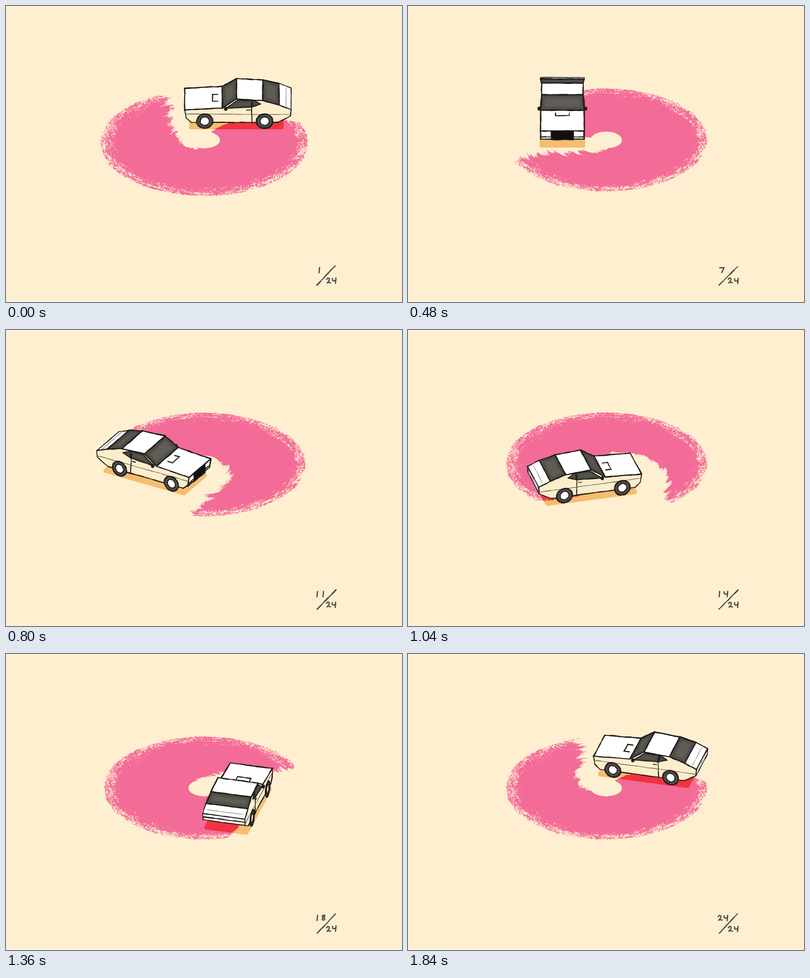
An HTML page with a canvas for the animation above (1.92 s loop, 800 by 600 pixels).

```html
<!DOCTYPE html>
<html lang="en">
<head>
<meta charset="utf-8">
<title>Drifting car</title>
<style>
  html, body { margin: 0; width: 100%; height: 100%; overflow: hidden; background: #fdefd0; }
  canvas { display: block; }
</style>
</head>
<body>
<canvas id="stage" width="800" height="600"></canvas>
<script>
const ctx = document.getElementById('stage').getContext('2d');
const PAPER = '#fdefd0', CREAM = '#fcedcb', WHITE = '#fff', GLASS = '#5f5d55', INK = '#1d1b18';
const RAD = Math.PI / 180, STEP = 80, STEPS = 24;
const clamp = (v, a = 0, b = 1) => Math.min(b, Math.max(a, v));

// Step, car angle, car radius, tail angle, inner lag of the tail, lag power, trail growth
const KEYS = [
  [0, 50.9, 111, 112, 80, 4, 6],
  [3, 96, 104, 140, 75, 2.2, 0],
  [6, 144, 99, 199, 45, 4, 0],
  [10, 207.6, 99, 261, 100, 3, 1],
  [13, 254.4, 108, 309, 130, 2, 0],
  [17, 312, 116, 382, 70, 4, 0],
  [23, 395.7, 113, 464, 85, 4, 0],
  [24, 410.9, 111, 472, 80, 4, 6]
];
function poseAt(n) {
  const i = KEYS.findIndex(k => k[0] > n), a = KEYS[i - 1], b = KEYS[i];
  const t = (n - a[0]) / (b[0] - a[0]);
  return a.map((v, j) => v + (b[j] - v) * t);
}

// Seeded randomness and value noise
let seed = 1;
function rnd() {
  seed = (seed * 1664525 + 1013904223) >>> 0;
  return seed / 4294967296;
}
const hash = (x, y) => {
  const s = Math.sin(x * 127.1 + y * 311.7) * 43758.5453;
  return s - Math.floor(s);
};
function noise(x, y) {
  const i = Math.floor(x), j = Math.floor(y), u = x - i, v = y - j;
  const top = hash(i, j) * (1 - u) + hash(i + 1, j) * u;
  const low = hash(i, j + 1) * (1 - u) + hash(i + 1, j + 1) * u;
  return top * (1 - v) + low * v;
}

// Crayon trail, shaded per pixel inside this box
const BOX = { x: 185, y: 158, w: 430, h: 234 };
const layer = document.createElement('canvas');
layer.width = BOX.w;
layer.height = BOX.h;
const pen = layer.getContext('2d');
const image = pen.createImageData(BOX.w, BOX.h);
const grain = new Float32Array(BOX.w * BOX.h);
for (let i = 0; i < grain.length; i++) {
  const x = i % BOX.w, y = Math.floor(i / BOX.w);
  const dx = x + BOX.x - 400, dy = (y + BOX.y - 271) * 1.94;
  const r = Math.hypot(dx, dy), a = Math.atan2(dy, dx);
  grain[i] = .6 * noise(x / 1.7, y / 1.7) + .4 * noise(r / 5, a * 9 + 40);
}

function drawTrail(n, [, car, , tail, lag, power, grow]) {
  const rx = 202 + grow, ry = rx * .515, cy = 271 + grow, px = image.data;
  const rag = Array.from({ length: 230 }, (_, k) => noise(k / 7, n * 9) * .7 + noise(k / 2, n * 5) * .3);
  for (let i = 0; i < grain.length; i++) {
    const x = i % BOX.w + BOX.x, y = Math.floor(i / BOX.w) + BOX.y;
    const dx = (x - 400) / rx, dy = (y - cy) / ry, r = Math.hypot(dx, dy);
    let alpha = 0;
    if (r < 1.03) {
      const u = clamp((r * 201 - 32) / 169);
      const start = car + 28 - 56 * u;
      const end = tail + lag * (1 - u) ** power - 360;
      const back = (((start - Math.atan2(-dy, dx) / RAD) % 360) + 360) % 360;
      const arc = RAD * r * rx, rim = (1 - r) * rx;
      const hole = Math.hypot((x - 400) / 31, (y - 271) / 16.5);
      const left = (start - end - back) * arc - (rag[Math.round(r * rx)] - .5) * 36;
      const dens = Math.min(
        clamp((rim + 5) / 6) * (.56 + .56 * clamp((rim - 8) / 38)),
        left / 22, back * arc / 6, (hole - 1) * 20);
      if (back < 359) alpha = clamp((dens - grain[i]) * 3 + .4);
    }
    px.set([243, 107, 151, alpha * 255], i * 4);
  }
  pen.putImageData(image, 0, 0);
}

function trace(c, pts) {
  c.beginPath();
  pts.forEach(p => c.lineTo(p[0], p[1]));
}

// Uneven hand-drawn line
function sketch(pts, w = 2.4, color = INK) {
  ctx.strokeStyle = color;
  ctx.lineCap = ctx.lineJoin = 'round';
  let last = pts[0];
  for (let i = 1; i < pts.length; i++) {
    const [ax, ay] = pts[i - 1], [bx, by] = pts[i];
    const parts = Math.ceil(Math.hypot(bx - ax, by - ay) / 11);
    for (let k = 1; k <= parts; k++) {
      const t = k / parts;
      const next = [ax + (bx - ax) * t + (rnd() - .5) * .7, ay + (by - ay) * t + (rnd() - .5) * .7];
      ctx.lineWidth = w * (.75 + rnd() * .5);
      trace(ctx, [last, next]);
      ctx.stroke();
      last = next;
    }
  }
}

function shape(pts, fill, w) {
  trace(ctx, pts);
  ctx.closePath();
  ctx.fillStyle = fill;
  ctx.fill();
  if (fill === GLASS) {
    ctx.save();
    ctx.clip();
    ctx.strokeStyle = 'rgba(30,29,25,.16)';
    for (const width of [16, 8]) {
      ctx.lineWidth = width;
      ctx.stroke();
    }
    ctx.restore();
  }
  sketch([...pts, pts[0]], w);
}

const facing = pts => pts.reduce((sum, p, i) => {
  const q = pts[(i + 1) % pts.length];
  return sum + p[0] * q[1] - q[0] * p[1];
}, 0) > 0;

// Car outline seen from the side: forward, up
const PROFILE = [[98, 18], [101, 36], [25, 40], [-4, 57], [-57, 54], [-90, 46], [-114, 37], [-113, 24]];
const FILLS = [WHITE, WHITE, GLASS, WHITE, GLASS, WHITE, WHITE];
const SILL = [[-113, 24], [-88, 11], [88, 11], [98, 20]];
const half = z => z > 50 ? 42 : 44;

function drawCar(n, [, angle, radius]) {
  const h = (180 + 15 * n) * RAD, sin = Math.sin(h), cos = Math.cos(h);
  const cx = 392 + radius * Math.cos(angle * RAD), cy = 268 - radius * Math.sin(angle * RAD) / 2;
  const at = (x, y, z) => [cx + x * cos - y * sin, cy - (x * sin + y * cos) / 2 - z];

  const shadow = [[88, 42], [88, -42], [-95, -42], [-95, 42]].map(p => at(...p, 0));
  const cast = (c, color) => {
    trace(c, shadow);
    c.closePath();
    c.fillStyle = c.strokeStyle = color;
    c.lineJoin = 'round';
    c.lineWidth = 8;
    c.fill();
    c.stroke();
  };
  cast(ctx, '#f5bd70');
  pen.save();
  pen.globalCompositeOperation = 'source-atop';
  pen.translate(-BOX.x, -BOX.y);
  cast(pen, '#f2323f');
  pen.restore();
  ctx.drawImage(layer, BOX.x, BOX.y);

  const mirror = side => {
    const [x, y] = at(18, side * 47, 40);
    ctx.fillStyle = INK;
    ctx.beginPath();
    ctx.ellipse(x, y, 3.4, 4, 0, 0, 7);
    ctx.fill();
  };
  mirror(1);
  mirror(-1);

  const details = {
    0() {
      shape([[22, 35], [-22, 35], [-22, 18], [22, 18]].map(([y, z]) => at(100, y, z)), '#11100f');
      for (const s of [-1, 1]) sketch([at(99, s * 42, 23), at(99, s * 24, 23)], 2);
    },
    1() { sketch([at(34, 14, 39), at(45, 14, 39), at(45, -14, 39), at(34, -14, 39)], 2); },
    5() { sketch([at(-104, 38, 41), at(-104, -38, 41)], 1.2, '#8d8a83'); },
    6() { sketch([at(-113, 43, 30), at(-113, -43, 30)], 2.4 * sin); }
  };
  const order = FILLS.map((_, i) => i);
  if (sin <= 0) order.reverse();
  for (const i of order) {
    const [a, b] = [PROFILE[i], PROFILE[i + 1]];
    const ha = half(a[1]), hb = half(b[1]);
    const pts = [at(a[0], ha, a[1]), at(a[0], -ha, a[1]), at(b[0], -hb, b[1]), at(b[0], hb, b[1])];
    if (!facing(pts)) continue;
    shape(pts, FILLS[i], i > 4 ? 1.8 : 2.4);
    details[i]?.();
  }

  if (Math.abs(cos) > .01) drawSide(cos < 0 ? 1 : -1, at, mirror);
}

function drawSide(side, at, mirror) {
  const map = pts => pts.map(([x, z]) => at(x, side * half(z), z));
  shape(map([...PROFILE.slice(1, 7), ...SILL]), CREAM, 2);
  shape(map([[18, 39], [-34, 42], [-35, 55], [-6, 55]]), GLASS, 2);
  shape(map([[-35, 42], [-37, 55], [-53, 48]]), GLASS, 1.8);
  sketch(map([[-34, 42], [-35, 11]]), 1.8);
  sketch(map([[97, 28], [-111, 27]]), 1.1, '#55524b');
  sketch(map([[-24, 36], [-31, 36]]), 1.8);
  for (const x of [60.5, -60.5]) {
    const ring = (w, t) => Array.from({ length: 20 }, (_, i) =>
      at(x + w * Math.cos(i * Math.PI / 10), side * 45, 14 + t * Math.sin(i * Math.PI / 10)));
    shape(ring(16.5, 14.5), '#4d4c46');
    shape(ring(9, 8.5), WHITE, 1.6);
  }
  mirror(side);
}

// Handwritten counter
const DIGITS = [
  'M5 0C0 0 0 11 4 11S9 0 4 0',
  'M4 0L3 11',
  'M1 3C3-1 8 0 6 5C4 9 1 11 2 10S6 9 9 10',
  'M1 1C8-1 7 5 3 5C9 5 8 12 1 10',
  'M1 1V5Q4 7 8 4M8 0L7 11',
  'M8 0H2L1 5C8 3 9 10 1 11',
  'M6 0C0 5 0 11 4 11S8 5 2 7',
  'M0 1H9L4 11',
  'M7 1C0-1 0 4 4 5S7 11 3 10S3 6 7 1',
  'M7 2C2-2 0 6 3 6S7 3 7 1L6 11'
].map(d => new Path2D(d));

function write(value, x, y) {
  ctx.strokeStyle = '#4a4743';
  ctx.lineWidth = 2.4;
  for (const digit of String(value)) {
    ctx.save();
    ctx.translate(x + rnd(), y + rnd());
    ctx.stroke(DIGITS[digit]);
    ctx.restore();
    x += 12;
  }
}

function drawCount(n) {
  write(n + 1, n < 9 ? 629 : 625, 529);
  sketch([[627 + rnd() * 2, 566], [665 + rnd() * 2, 526 + rnd() * 2]], 2.4, '#4a4743');
  write(STEPS, 646, 551);
}

function draw(n) {
  seed = n * 977 + 13;
  const pose = poseAt(n);
  ctx.fillStyle = PAPER;
  ctx.fillRect(0, 0, 800, 600);
  drawTrail(n, pose);
  drawCar(n, pose);
  drawCount(n);
}

let shown = -1;
const begin = performance.now();
function tick() {
  const n = Math.floor((performance.now() - begin) / STEP) % STEPS;
  if (n !== shown) draw(shown = n);
  requestAnimationFrame(tick);
}
tick();
</script>
</body>
</html>
```
